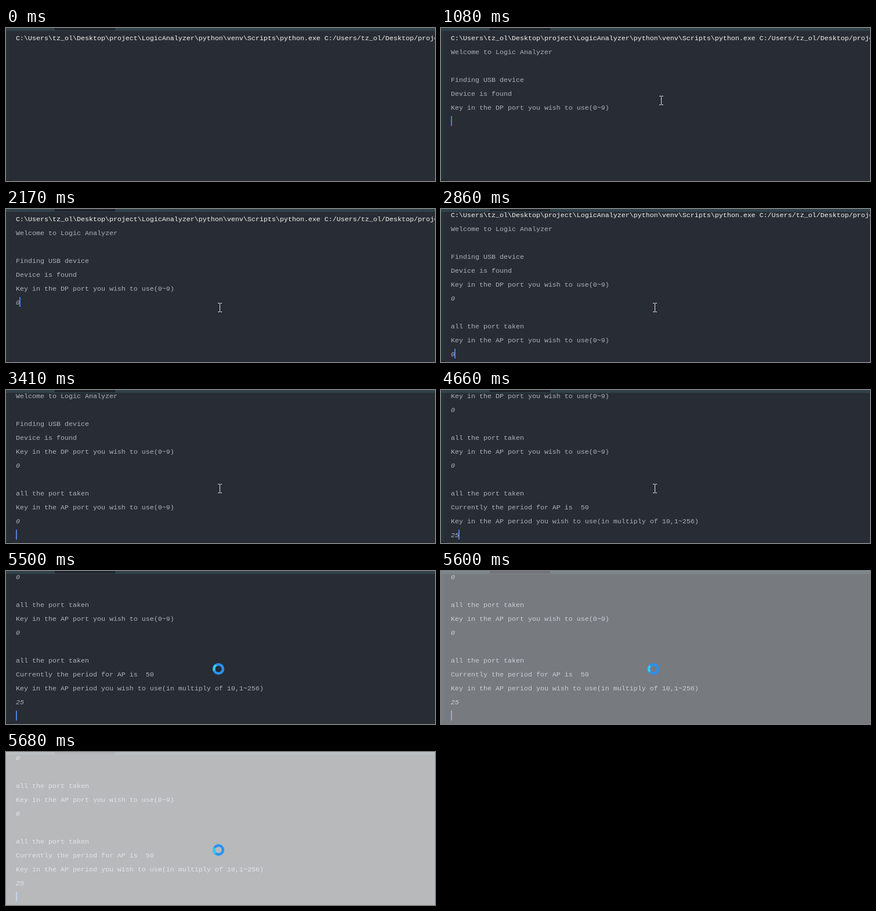
Animation, 739 px wide and 264 px high, one loop 5.75 s. Source, as an HTML page:

```html
<!DOCTYPE html>
<html lang="en">
<head>
<meta charset="utf-8">
<title>Logic analyzer console</title>
<style>
  html, body { margin: 0; width: 100%; height: 100%; overflow: hidden; background: #282c34; }
  svg { display: block; }
  text {
    font: 11.667px "Liberation Mono", "Courier New", monospace;
    fill: #abb2bf;
    white-space: pre;
  }
  .command { fill: #f6f6f0; }
  .input { font-style: italic; }
</style>
</head>
<body>
<svg width="739" height="264" viewBox="0 0 739 264">
  <rect width="739" height="264" fill="#282c34"/>
  <rect width="5" height="264" fill="#263238"/>
  <rect y="262" width="10" height="2" fill="#20272c"/>
  <g id="console"></g>
  <rect id="caret" width="2" height="17" fill="#4f7fdc"/>
  <rect width="739" height="5" fill="#30424a"/>
  <rect x="84" width="104" height="4" fill="#1f252b"/>
  <rect id="fade" width="739" height="264" fill="#fff"/>
  <path id="beam" d="M-3-7.5H0M1-7.5H4M.5-7V7M-3 7.5H0M1 7.5H4" fill="none" stroke="#e6e6e6"/>
  <g id="spinner" fill="none" stroke-width="4.4">
    <circle r="7.8" stroke="#2893f2"/>
    <path id="glint" d="M5.97-5.02A7.8 7.8 0 0 1 5.97 5.02" stroke="#35c8fb"/>
  </g>
</svg>
<script>
const LOOP = 5750, LEFT = 17, CHAR = 7, ROW = 24;
const byId = id => document.getElementById(id);
const consoleBox = byId("console"), caret = byId("caret"), fade = byId("fade");
const beam = byId("beam"), spinner = byId("spinner"), glint = byId("glint");

const lines = [
  String.raw`C:\Users\tz_ol\Desktop\project\LogicAnalyzer\python\venv\Scripts\python.exe C:/Users/tz_ol/Desktop/project`,
  "Welcome to Logic Analyzer",
  "",
  "Finding USB device",
  "Device is found",
  "Key in the DP port you wish to use(0~9)",
  "0",
  "",
  "all the port taken",
  "Key in the AP port you wish to use(0~9)",
  "0",
  "",
  "all the port taken",
  "Currently the period for AP is  50",
  "Key in the AP period you wish to use(in multiply of 10,1~256)",
  "25"
];
const inputRows = [6, 10, 15];

// Each step overrides some values: shown rows, centre of the first row, caret [row, column].
const steps = [
  { t: 0, shown: 1, top: 17, caret: null },
  { t: 320, shown: 2 },
  { t: 396, shown: 4 },
  { t: 472, shown: 5 },
  { t: 548, shown: 6 },
  { t: 1080, caret: [6, 0] },
  { t: 2170, shown: 7, caret: [6, 1] },
  { t: 2400, caret: [7, 0] },
  { t: 2630, caret: [8, 0] },
  { t: 2780, shown: 10, top: 10, caret: [10, 0] },
  { t: 2860, shown: 11, caret: [10, 1] },
  { t: 3410, top: -14, caret: [11, 0] },
  { t: 3560, top: -38, caret: [12, 0] },
  { t: 3790, shown: 15, top: -110, caret: [15, 0] },
  { t: 4260, caret: null },
  { t: 4430, shown: 16, caret: [15, 1] },
  { t: 4660, caret: [15, 2] },
  { t: 5270, top: -134, caret: [16, 0] }
];

const rows = lines.map((line, i) => {
  const el = document.createElementNS("http://www.w3.org/2000/svg", "text");
  el.setAttribute("x", LEFT);
  el.setAttribute("y", i * ROW + 4);
  if (i === 0) el.classList.add("command");
  if (inputRows.includes(i)) el.classList.add("input");
  el.textContent = line;
  return consoleBox.appendChild(el);
});

const show = (el, on) => el.setAttribute("visibility", on ? "visible" : "hidden");
const move = (el, x, y) => el.setAttribute("transform", `translate(${x} ${y})`);

// Moves the pointer in equal held steps from one point to another.
function stepped(t, start, end, count, [x0, y0], [x1, y1]) {
  const k = Math.floor((t - start) / (end - start) * (count - 1) + 0.001);
  const p = Math.min(1, Math.max(0, k / (count - 1)));
  return [Math.round(x0 + (x1 - x0) * p), Math.round(y0 + (y1 - y0) * p)];
}

function beamAt(t) {
  return t < 1080
    ? stepped(t, 320, 700, 6, [473, 20], [382, 110])
    : stepped(t, 1004, 1310, 5, [382, 110], [368, 170]);
}

function draw(t) {
  const state = Object.assign({}, ...steps.filter(s => s.t <= t));
  move(consoleBox, 0, state.top);
  rows.forEach((row, i) => show(row, i < state.shown));
  rows[15].textContent = t < 4660 ? "2" : "25";

  show(caret, state.caret);
  if (state.caret) {
    const [row, col] = state.caret;
    move(caret, LEFT + col * CHAR - (col ? 1 : 0), state.top + row * ROW - 9);
  }

  const busy = t >= 5500;
  show(beam, t >= 320 && !busy);
  move(beam, ...beamAt(t));
  show(spinner, busy);
  move(spinner, 366, 169);
  glint.setAttribute("transform", `rotate(${t < 5600 ? 198 : t < 5680 ? 184 : 170})`);
  fade.setAttribute("opacity", t < 5600 ? 0 : t < 5680 ? 0.37 : 0.665);
}

const begin = performance.now();
function tick() {
  draw((performance.now() - begin) % LOOP);
  requestAnimationFrame(tick);
}
tick();
</script>
</body>
</html>
```
